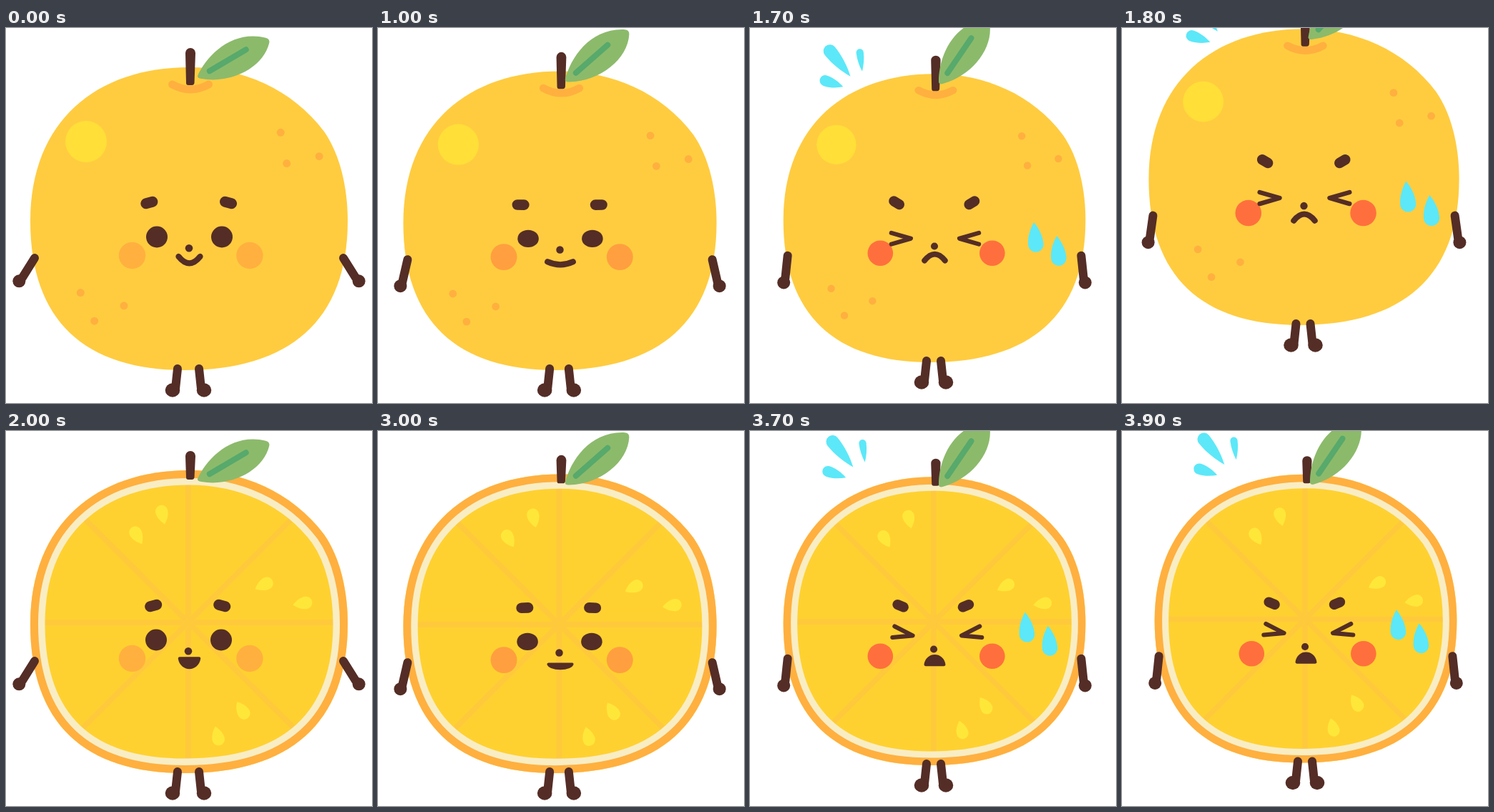
Write an HTML page with a canvas that moves like this. It is 512 px wide and 525 px high and loops after 4 s.

```html
<!DOCTYPE html>
<html lang="en">
<head>
<meta charset="utf-8">
<title>Hopping orange</title>
<style>
html, body { margin: 0; width: 100%; height: 100%; overflow: hidden; background: #fff; }
canvas { display: block; width: 512px; height: 525px; }
</style>
</head>
<body>
<canvas id="stage"></canvas>
<script>
const W = 512, H = 525, HALF = 2000;
const canvas = document.getElementById('stage');
const ctx = canvas.getContext('2d');
const dpr = window.devicePixelRatio || 1;
canvas.width = W * dpr;
canvas.height = H * dpr;

const C = {
  peel: '#ffcc40', pulp: '#ffd130', ring: '#ffb03f', pith: '#f9edc4', spoke: '#ffc93c',
  seed: '#ffe73a', shine: '#ffdf38', brown: '#542d26', leaf: '#8cba6b', vein: '#57a96c',
  drop: '#5ce8f8', warm: '#ffb03f', hot: '#ff9f3f', red: '#ff6f3d'
};

// Fruit and face are drawn at rest size, standing on (CX, FLOOR), then scaled and moved.
const CX = 256, FLOOR = 479, WIDTH = 444, HEIGHT = 424;

// x, y: bottom centre; effort: 0 calm to 1 straining; leaf, swing: degrees; crouch: bent legs.
const calm = { x: 256, y: 479, size: 1, effort: 0, leaf: -26.6, swing: 32, crouch: 0 };
const tense = { x: 254.5, y: 479, size: 0.987, effort: 1 / 3, leaf: -37.5, swing: 13, crouch: 0 };
const crouch = { x: 255, y: 494, size: 0.987, effort: 2 / 3, leaf: -37, swing: 29, crouch: 1 };
const rise = { x: 258, y: 468, size: 0.952, effort: 1, leaf: -52, swing: 6, crouch: 0 };
const peak = { ...rise, x: 254.5, y: 416, size: 0.978, leaf: -43, swing: 8 };
const fall = { ...rise, x: 257, y: 464.5 };

const mix = (a, b, k) => a + (b - a) * k;
const blend = (a, b, k) => Object.fromEntries(Object.keys(a).map(n => [n, mix(a[n], b[n], k)]));

const steps = [
  [0, calm], [1000, tense], [1100, blend(tense, crouch, 0.5)], [1200, crouch],
  [1700, rise], [1800, peak], [1900, fall]
];
const poseAt = t => steps.findLast(([start]) => t >= start)[1];

const rad = deg => deg * Math.PI / 180;
const polar = (x, y, deg, r) => [x + r * Math.cos(rad(deg)), y + r * Math.sin(rad(deg))];

function ellipse(x, y, rx, ry, color, turn = 0) {
  ctx.fillStyle = color;
  ctx.beginPath();
  ctx.ellipse(x, y, rx, ry, rad(turn), 0, 2 * Math.PI);
  ctx.fill();
}

const dot = (x, y, r, color) => ellipse(x, y, r, r, color);

function line(points, width, color) {
  ctx.strokeStyle = color;
  ctx.lineWidth = width;
  ctx.beginPath();
  for (let i = 0; i < points.length; i += 2) ctx.lineTo(points[i], points[i + 1]);
  ctx.stroke();
}

// Shallow arc centred on x, sagging by `sag` from its ends.
function bow(x, y, half, sag, width, color) {
  ctx.strokeStyle = color;
  ctx.lineWidth = width;
  ctx.beginPath();
  ctx.moveTo(x - half, y);
  ctx.quadraticCurveTo(x, y + 2 * sag, x + half, y);
  ctx.stroke();
}

// Draws inside a local frame; side -1 mirrors it.
function local(x, y, turn, side, paint) {
  ctx.save();
  ctx.translate(x, y);
  ctx.scale(side, 1);
  ctx.rotate(rad(turn));
  paint();
  ctx.restore();
}

// Teardrop with a round head at (x, y), pointing along `turn`.
function tear(x, y, turn, len, r, color) {
  local(x, y, turn, 1, () => {
    ctx.fillStyle = color;
    ctx.beginPath();
    ctx.moveTo(len, 0);
    ctx.bezierCurveTo(len * 0.7, -r * 0.6, len * 0.35, -r, 0, -r);
    ctx.arc(0, 0, r, -Math.PI / 2, Math.PI / 2, true);
    ctx.bezierCurveTo(len * 0.35, r, len * 0.7, r * 0.6, len, 0);
    ctx.fill();
  });
}

const outline = new Path2D(
  'M256 55C330 55 400 85 445 145C468 178 478 225 478 270' +
  'C478 410 396 479 250 479C110 479 34 410 34 270C34 130 127 55 256 55Z');
const leafShape = new Path2D(
  'M0 0C25 -20 72 -36 109 -5Q114 -1 110 4C88 30 38 32 3 6Q-2 3 0 0Z');

function drawSpots(x, y, turn) {
  dot(...polar(x, y, turn - 142, 33), 5.5, C.ring);
  dot(...polar(x, y, turn, 34), 5.5, C.ring);
  dot(...polar(x, y, turn + 112, 21.5), 5.5, C.ring);
}

function drawPeel() {
  ctx.fillStyle = C.peel;
  ctx.fill(outline);
  dot(112, 159, 29, C.shine);
  drawSpots(405, 172, 13);
  drawSpots(131, 390, -2);
  bow(258, 79, 25.5, 7, 11, C.ring);
}

function drawSlice() {
  const x = 255, y = 268;
  ctx.fillStyle = C.pulp;
  ctx.fill(outline);
  ctx.save();
  ctx.clip(outline);
  for (let turn = 0; turn < 180; turn += 45) {
    line([...polar(x, y, turn, 205), ...polar(x, y, turn + 180, 205)], 8, C.spoke);
  }
  for (const [width, color] of [[41, C.pith], [22, C.ring]]) {
    ctx.lineWidth = width;
    ctx.strokeStyle = color;
    ctx.stroke(outline);
  }
  ctx.restore();
  // Pairs of seeds pointing at the core: direction, distance, spread.
  for (const [dir, dist, spread] of [[-112, 153, 7], [-18, 145, 22], [67, 159, 10]]) {
    for (const side of [-1, 1]) {
      const turn = dir + 8.5 * side;
      tear(...polar(x, y, turn, dist + spread * side), turn + 180, 18.5, 8.7, C.seed);
    }
  }
}

function drawStem(bottom) {
  ctx.fillStyle = C.brown;
  ctx.beginPath();
  ctx.moveTo(251, 35);
  ctx.arc(258, 35, 7, Math.PI, 0);
  ctx.lineTo(263.5, bottom - 3);
  ctx.quadraticCurveTo(263, bottom, 260, bottom);
  ctx.lineTo(255, bottom);
  ctx.quadraticCurveTo(252, bottom, 252, bottom - 3);
  ctx.fill();
}

function drawEye(effort, sliced, side) {
  if (effort < 1) {
    const slant = 40 * Math.max(0, effort - 1 / 3);
    ellipse((sliced ? 255.5 : 256.5) + 45.5 * side, 292.5, 15, 15 - 8 * effort, C.brown, -slant * side);
    return;
  }
  const [x, y, tilt] = sliced ? [260, 285.5, 11] : [257, 297, 0];
  local(x + 50 * side, y, tilt, -side, () =>
    line([-14.3, -8.3, 14.3, 0, -14.3, 8.3], 6.4, C.brown));
}

function drawMouth(effort, sliced) {
  const wide = Math.sin(Math.PI * effort);
  const curl = 1 - 2 * effort ** 1.15;
  const x = 256.5, y = 324.7 + 3 * wide, half = 15 + 3.5 * wide;
  if (!sliced) {
    bow(x, y - 4.7 * curl, half, 9.4 * curl, 8.3, C.brown);
    return;
  }
  const flat = y - 6.2 * curl, w = half - 1.5;
  const deep = flat + 12.4 * curl / 0.75;
  ctx.fillStyle = ctx.strokeStyle = C.brown;
  ctx.lineWidth = 4.5;
  ctx.beginPath();
  ctx.moveTo(x - w, flat);
  ctx.bezierCurveTo(x - w * 0.8, deep, x + w * 0.8, deep, x + w, flat);
  ctx.closePath();
  ctx.fill();
  ctx.stroke();
}

function drawFace(effort, sliced) {
  const blush = effort === 0 ? C.warm : effort < 1 ? C.hot : C.red;
  const frown = -15 + (sliced ? 38 : 46) * effort;
  const [browX, browGap] = sliced ? [254.2, 48] : [255.7, 55.3];
  for (const side of [-1, 1]) {
    dot(258.7 + 82.2 * side, 318.5, 18.7, blush);
    local(browX + browGap * side, 244.5, frown, -side, () =>
      line([-4.8, 0, 4.8, 0], 14.8, C.brown));
    drawEye(effort, sliced, side);
  }
  dot(sliced ? 255 : 256, 308.3, 5.3, C.brown);
  drawMouth(effort, sliced);
}

function drawDrops(sliced) {
  // A fan of three splashes, then two drops of sweat.
  const [fx, fy] = sliced ? [158, 67] : [154, 85];
  for (const i of [-1, 0, 1]) {
    const turn = 51 + 32 * i, len = i ? 28 : 48;
    tear(...polar(fx, fy, turn + 180, 34 + len), turn, len, i ? 6.7 - 1.3 * i : 9.5, C.drop);
  }
  const [sx, sy] = sliced ? [392, 286.6] : [405, 305.6];
  for (const i of [0, 1]) tear(sx + 33.6 * i, sy + 20 * i, -95, 32.7, 11.3, C.drop);
}

function drawLeaf(pose) {
  const x = pose.x + 6 + 6 * (1 - pose.effort) ** 4;
  const y = pose.y - HEIGHT * pose.size + 12;
  local(x, y, pose.leaf, 1, () => {
    ctx.fillStyle = C.leaf;
    ctx.fill(leafShape);
    line([18, 1.5, 77, -2.5], 8, C.vein);
  });
}

function drawArm(pose, side) {
  const x = pose.x + side * (WIDTH / 2 * pose.size - 6);
  const y = pose.y - 0.37 * HEIGHT * pose.size;
  const down = 90 - pose.swing * side;
  line([x, y, ...polar(x, y, down, 32)], 12, C.brown);
  const [hx, hy] = polar(x, y, down, 38);
  dot(hx + 1.5 * side, hy, 9, C.brown);
}

function drawLeg({ x, y, effort, crouch }, side) {
  const hipX = x - 1 + 6 * crouch + side * (15 - 5 * effort + 25 * crouch);
  const hipY = y - 2 - 5 * crouch;
  const ankleX = hipX + side * (3 + 8 * crouch), ankleY = hipY + 28 - 2 * crouch;
  ctx.strokeStyle = C.brown;
  ctx.lineWidth = 12 - crouch;
  ctx.beginPath();
  ctx.moveTo(hipX, hipY);
  ctx.bezierCurveTo(
    mix(hipX, ankleX, 1 / 3) + side * 19 * crouch, mix(hipY, ankleY, 1 / 3) - 6 * crouch,
    mix(hipX, ankleX, 2 / 3) - side * 2 * crouch, mix(hipY, ankleY, 2 / 3) - 4 * crouch,
    ankleX, ankleY);
  ctx.stroke();
  ellipse(ankleX + side * 4, ankleY + 2, 10.3, 9.7, C.brown);
}

function draw(time) {
  const t = time % (2 * HALF);
  const sliced = t >= HALF;
  const pose = poseAt(t % HALF);

  ctx.setTransform(dpr, 0, 0, dpr, 0, 0);
  ctx.fillStyle = '#fff';
  ctx.fillRect(0, 0, W, H);
  ctx.lineCap = ctx.lineJoin = 'round';

  ctx.save();
  ctx.translate(pose.x, pose.y);
  ctx.scale(pose.size, pose.size);
  ctx.translate(-CX, -FLOOR);
  if (sliced) drawSlice(); else drawPeel();
  drawStem(sliced ? 68 : 80);
  drawFace(pose.effort, sliced);
  if (pose.effort === 1) drawDrops(sliced);
  ctx.restore();

  drawLeaf(pose);
  for (const side of [-1, 1]) {
    drawArm(pose, side);
    drawLeg(pose, side);
  }
}

let start = null;
function tick(now) {
  if (start === null) start = now;
  draw(now - start);
  requestAnimationFrame(tick);
}
draw(0);
requestAnimationFrame(tick);
</script>
</body>
</html>
```
